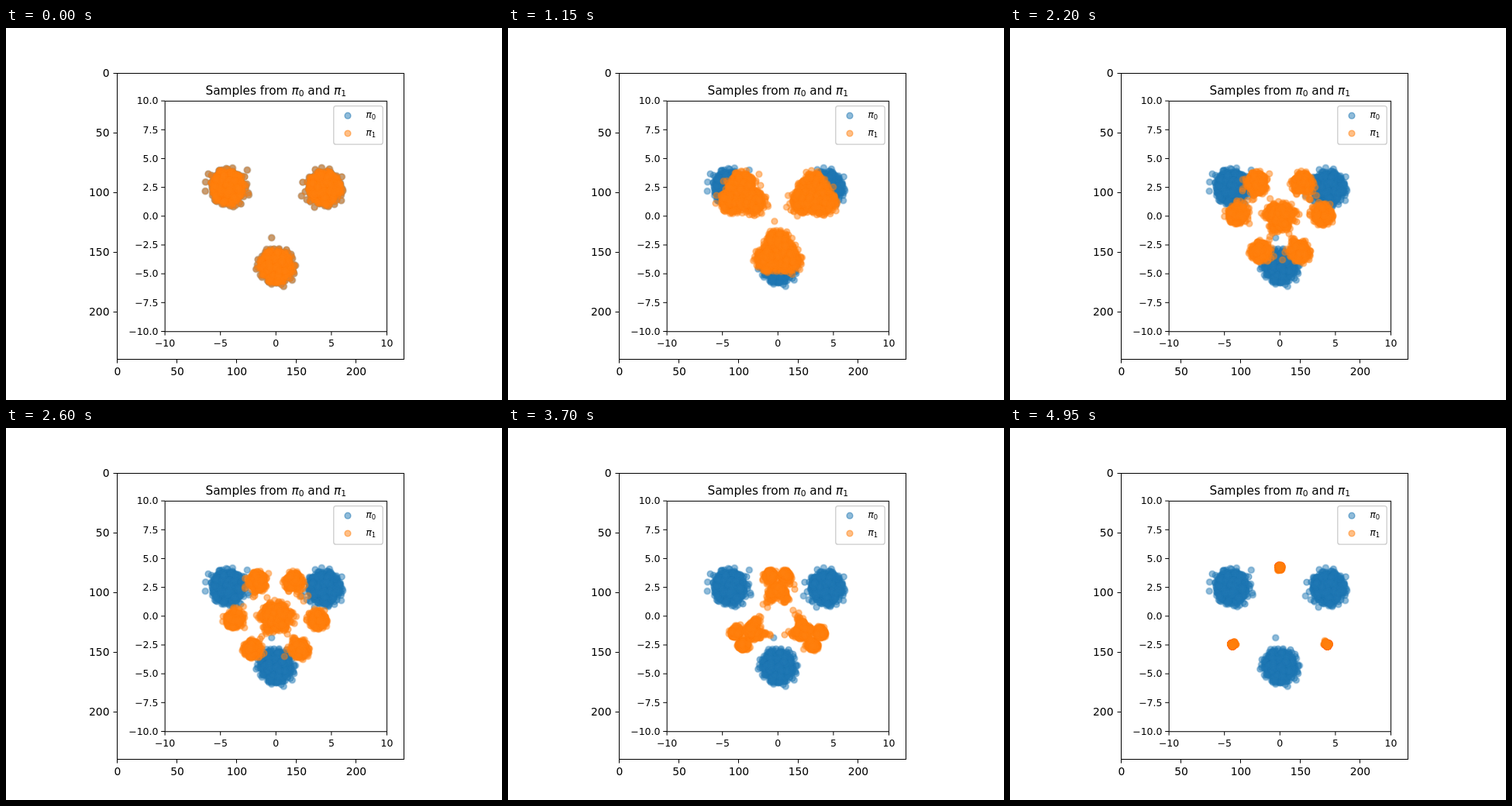
Animation, 640 px wide and 480 px high, one loop 5000 ms. Source, as an HTML page with a canvas:

```html
<!DOCTYPE html>
<html lang="en">
<head>
<meta charset="utf-8">
<title>Samples</title>
<style>
  html, body { margin: 0; width: 100%; height: 100%; overflow: hidden; background: #fff; }
  svg, canvas { position: absolute; left: 0; top: 0; width: 640px; height: 480px; }
  .soft { filter: blur(.4px); }
  text { font-family: "DejaVu Sans", sans-serif; fill: #000; }
  .pi { font-style: italic; }
</style>
</head>
<body>
<svg id="chart" viewBox="0 0 640 480"></svg>
<canvas id="plot" width="640" height="480"></canvas>
<script>
const FRAMES = 100, STEP = 50, COUNT = 6000, SIGMA = 0.54;
const BLUE = '#1f77b4', ORANGE = '#ff7f0e';
const H = 2.5 * Math.sqrt(3);
const SOURCES = [[-H, 2.5], [H, 2.5], [0, -H]];
const TARGETS = [[0, H], [-H, -2.5], [H, -2.5]];
const px = x => 348.3 + x * 14.32;
const py = y => 242.8 - y * 14.87;

// Chart furniture
const line = (x1, y1, x2, y2) =>
  `<path d="M${x1} ${y1}L${x2} ${y2}" stroke="#000" stroke-width="1"/>`;
const label = (x, y, size, anchor, str) =>
  `<text x="${x}" y="${y}" font-size="${size}" text-anchor="${anchor}">${str}</text>`;
const pi = (n, size) =>
  `<tspan class="pi">π</tspan><tspan dy="2" font-size="${size * 0.7}">${n}</tspan>`;
const minus = s => String(s).replace('-', '−');

let outer = '<rect x="143.5" y="58.5" width="370" height="369" fill="none" stroke="#000"/>';
for (let v = 0; v <= 200; v += 50) {
  const x = 143.97 + v * 1.54, y = 58.37 + v * 1.54;
  const tx = Math.floor(x) + 0.5, ty = Math.floor(y) + 0.5;
  outer += line(tx, 428, tx, 432.5) + line(138.5, ty, 143, ty);
  outer += label(x, 447.7, 13.89, 'middle', v) + label(133.5, y + 5.1, 13.89, 'end', v);
}

let inner = '<rect x="205.2" y="94.4" width="286.3" height="297.3" fill="none" stroke="#222" stroke-width="1.2"/>';
for (let i = 0; i <= 8; i++) {
  const v = 10 - i * 2.5, y = py(v);
  inner += line(200.2, y, 205, y) + label(196.5, y + 4.3, 12.5, 'end', minus(v.toFixed(1)));
}
for (let v = -10; v <= 10; v += 5) {
  inner += line(px(v), 392, px(v), 396.6) + label(px(v), 411, 12.5, 'middle', minus(v));
}
inner += label(348.3, 86, 15.35, 'middle',
  `Samples from ${pi(0, 15.35)}<tspan dy="-2"> and </tspan>${pi(1, 15.35)}`);
inner += '<rect x="422.8" y="100.6" width="63.4" height="49.6" rx="3" fill="#fff" stroke="#ccc" stroke-width="1.3"/>';
[BLUE, ORANGE].forEach((color, i) => {
  const y = 113.2 + i * 22.8;
  inner += `<circle cx="441" cy="${y}" r="3.85" fill="${color}" fill-opacity=".5" stroke="${color}" stroke-opacity=".5" stroke-width="1.5"/>`;
  inner += label(464.5, y + 3.2, 12.1, 'start', pi(i, 12.1));
});
document.getElementById('chart').innerHTML = `${outer}<g class="soft">${inner}</g>`;

// Seeded samples
let seed = 20;
function random() {
  seed = (seed + 0x6D2B79F5) | 0;
  let r = Math.imul(seed ^ (seed >>> 15), 1 | seed);
  r = (r + Math.imul(r ^ (r >>> 7), 61 | r)) ^ r;
  return ((r ^ (r >>> 14)) >>> 0) / 4294967296;
}
const start = new Float32Array(COUNT * 2);
for (let i = 0; i < COUNT; i++) {
  const [cx, cy] = SOURCES[Math.floor(random() * 3)];
  const r = SIGMA * Math.sqrt(-2 * Math.log(1 - random()));
  const a = random() * Math.PI * 2;
  start[2 * i] = cx + r * Math.cos(a);
  start[2 * i + 1] = cy + r * Math.sin(a);
}

// Share of the starting position left at time t
const remain = t => (1 - t) * (1 - 0.8 * t * t);

// One flow step: expected target minus expected origin, blurred more as t grows
function advance(from, t, next) {
  const dt = next - t, a = remain(t), da = remain(next) - a;
  const blur = 0.15 + 0.8 * t;
  const signal = a * a * SIGMA * SIGMA;
  const variance = signal + blur * blur;
  const pairs = [];
  for (const s of SOURCES) {
    for (const g of TARGETS) {
      pairs.push({ s, g, x: a * s[0] + t * g[0], y: a * s[1] + t * g[1] });
    }
  }
  const to = new Float32Array(from.length);
  const d = new Float64Array(pairs.length);
  for (let i = 0; i < from.length; i += 2) {
    const x = from[i], y = from[i + 1];
    let near = Infinity;
    pairs.forEach((p, k) => {
      d[k] = ((x - p.x) ** 2 + (y - p.y) ** 2) / (2 * variance);
      near = Math.min(near, d[k]);
    });
    let sum = 0, gx = 0, gy = 0, sx = 0, sy = 0;
    pairs.forEach((p, k) => {
      const w = Math.exp(near - d[k]);
      sum += w;
      gx += w * p.g[0];
      gy += w * p.g[1];
      sx += w * p.s[0];
      sy += w * p.s[1];
    });
    gx /= sum; gy /= sum; sx /= sum; sy /= sum;
    const inside = signal / variance / a;
    const ox = sx + (x - a * sx - t * gx) * inside;
    const oy = sy + (y - a * sy - t * gy) * inside;
    to[i] = x + dt * gx + da * (ox + (x - t * gx) / a) / 2;
    to[i + 1] = y + dt * gy + da * (oy + (y - t * gy) / a) / 2;
  }
  return to;
}

const states = [start];
for (let k = 1; k < FRAMES; k++) {
  states.push(advance(states[k - 1], (k - 1) / FRAMES, k / FRAMES));
}

// Drawing
function makeCanvas(w, h) {
  const c = document.createElement('canvas');
  c.width = w;
  c.height = h;
  return c;
}

function makeDot(color) {
  const c = makeCanvas(12, 12), g = c.getContext('2d');
  g.globalAlpha = 0.5;
  g.fillStyle = g.strokeStyle = color;
  g.lineWidth = 1.5;
  g.arc(6, 6, 3.85, 0, Math.PI * 2);
  g.fill();
  g.stroke();
  return c;
}

function scatter(g, points, dot) {
  for (let i = 0; i < points.length; i += 2) {
    g.drawImage(dot, px(points[i]) - 6, py(points[i + 1]) - 6);
  }
}

const ctx = document.getElementById('plot').getContext('2d');
const orangeDot = makeDot(ORANGE);
const base = makeCanvas(640, 480);
scatter(base.getContext('2d'), start, makeDot(BLUE));

let shown = -1;
function render(now) {
  const k = Math.floor(now / STEP) % FRAMES;
  if (k !== shown) {
    shown = k;
    ctx.clearRect(0, 0, 640, 480);
    ctx.drawImage(base, 0, 0);
    scatter(ctx, states[k], orangeDot);
  }
  requestAnimationFrame(render);
}
render(0);
</script>
</body>
</html>
```
